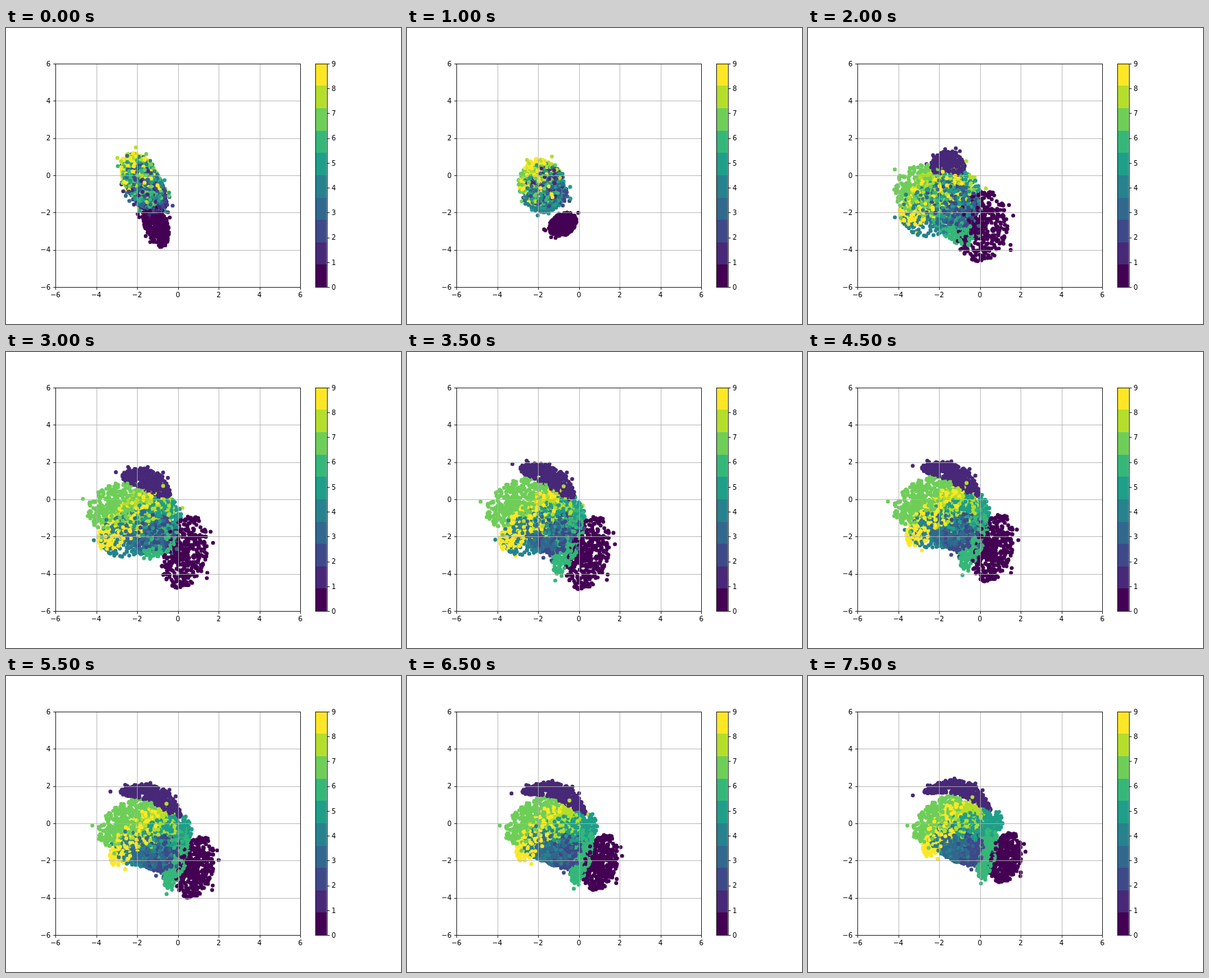
An HTML page with a canvas that plays this animation: 576x432 px, repeating every 8 s.

```html
<!DOCTYPE html>
<html lang="en">
<head>
<meta charset="utf-8">
<title>Scatter of ten classes</title>
<style>
  html, body { margin: 0; width: 576px; height: 432px; overflow: hidden; background: #fff; }
  canvas { display: block; }
</style>
</head>
<body>
<canvas id="plot" width="576" height="432"></canvas>
<script>
const ctx = document.getElementById('plot').getContext('2d');
const COLORS = ['#440154', '#482878', '#3e4989', '#31688e', '#26828e',
                '#1f9e89', '#35b779', '#6ece58', '#b5de2b', '#fde725'];
const LOOP = 8000, STEP = 500, COUNT = 4200, RADIUS = 2.85;
const BOX = { x: 72, y: 51.84, w: 357.12, h: 326.16 };
const BAR = { x: 451.4, w: 16.3 };

const px = x => BOX.x + (x + 6) / 12 * BOX.w;
const py = y => BOX.y + (6 - y) / 12 * BOX.h;
const snap = v => Math.floor(v + 0.5) + 0.5;

// Cross-axis spread of each class.
const WIDTHS = [.46, .25, .4, .45, .53, .48, .27, .5, .5, .36];

// Each class: centre x, y and long axis x, y.
const start = WIDTHS.map((w, c) => c
  ? [-1.5 - .035 * c, -.85 + .08 * c, -.3, .58, .38]
  : [-1.08, -2.6, .17, -.55, .26]);
const spread = [
  [.1, -2.75, .08, .85], [-1.55, .6, .38, -.05], [-1.2, -1.6, .4, -.4],
  [-1.5, -1.6, .5, -.4], [-2.1, -1.75, .75, .4], [-1.35, -1.1, .4, .5],
  [-1.5, -2.35, .45, -.62], [-2.75, -.8, .65, .1], [-1.9, -.95, .7, .4],
  [-2.35, -1.2, .7, .6]
];
const sorted = [
  [.45, -2.9, .2, .88], [-1.4, 1.1, .6, -.4], [-1, -1.85, .4, .4],
  [-1.5, -1.8, .5, -.3], [-2.1, -1.7, .75, .35], [-.95, -1, .5, .3],
  [-.5, -2.2, .26, .82], [-3, -.15, .65, .45], [-1.5, -.8, .5, .4],
  [-2.4, -1.1, .65, .72]
];
const finish = [
  [1.25, -1.85, .13, .6], [-.92, 1.72, .75, -.25], [-.45, -1.4, .1, .4],
  [-1.1, -1.3, .35, -.25], [-1.4, -.9, .45, -.2], [-.1, -.1, .55, .15],
  [.35, -1.6, .12, .62], [-2.05, .25, .5, .5], [-.8, .1, .35, .4],
  [-1.8, -.25, .4, .7]
];
const withWidth = (rows, k) => rows.map((r, c) => [...r, WIDTHS[c] * k]);
const KEYS = [
  { t: 0, rows: start },
  { t: 2000, rows: withWidth(spread, 1.25) },
  { t: 3500, rows: withWidth(sorted, 1) },
  { t: 7500, rows: withWidth(finish, .76) }
];

let seed = 20117;
function rand() {
  seed = seed + 0x6D2B79F5 | 0;
  let v = Math.imul(seed ^ seed >>> 15, 1 | seed);
  v = v + Math.imul(v ^ v >>> 7, 61 | v) ^ v;
  return ((v ^ v >>> 14) >>> 0) / 4294967296;
}

const dots = Array.from({ length: COUNT }, () => {
  const c = Math.floor(rand() * 10);
  const angle = rand() * 2 * Math.PI;
  const stray = rand() < .04 ? 1.35 : 1;
  const r = 2.2 * stray * Math.pow(rand(), .6);
  return { c, a: r * Math.cos(angle), b: r * Math.sin(angle) };
});

function poseAt(t) {
  let i = 0;
  while (i < KEYS.length - 2 && t >= KEYS[i + 1].t) i++;
  const from = KEYS[i], to = KEYS[i + 1];
  let f = (t - from.t) / (to.t - from.t);
  if (i === 0) f *= f;
  return from.rows.map((row, c) => row.map((v, j) => v + (to.rows[c][j] - v) * f));
}

function line(x1, y1, x2, y2) {
  ctx.beginPath();
  ctx.moveTo(x1, y1);
  ctx.lineTo(x2, y2);
  ctx.stroke();
}

function drawDots(t) {
  const pose = poseAt(t), bend = .16 * t / 7500;
  for (const { c, a, b } of dots) {
    const [mx, my, ux, uy, w] = pose[c];
    const len = Math.hypot(ux, uy);
    const off = w * b - (c === 1 ? bend * (a * a - 1) : 0);
    ctx.fillStyle = COLORS[c];
    ctx.beginPath();
    ctx.arc(px(mx + ux * a - uy / len * off), py(my + uy * a + ux / len * off),
            RADIUS, 0, 2 * Math.PI);
    ctx.fill();
  }
}

function drawAxes() {
  const left = snap(BOX.x), right = snap(BOX.x + BOX.w);
  const top = snap(BOX.y), bottom = snap(BOX.y + BOX.h);
  ctx.lineWidth = .8;
  ctx.strokeStyle = '#b0b0b0';
  for (let v = -4; v <= 4; v += 2) {
    line(snap(px(v)), top, snap(px(v)), bottom);
    line(left, snap(py(v)), right, snap(py(v)));
  }
  ctx.strokeStyle = ctx.fillStyle = '#000';
  ctx.strokeRect(left, top, right - left, bottom - top);
  for (let v = -6; v <= 6; v += 2) {
    const label = String(v).replace('-', '\u2212');
    const x = snap(px(v)), y = snap(py(v));
    line(x, bottom, x, bottom + 3.5);
    line(left - 3.5, y, left, y);
    ctx.textAlign = 'center';
    ctx.fillText(label, px(v), 392.6);
    ctx.textAlign = 'right';
    ctx.fillText(label, 65, py(v) + 3.8);
  }
}

function drawBar() {
  const band = BOX.h / 10, end = BAR.x + BAR.w;
  COLORS.forEach((color, i) => {
    const y1 = Math.round(378 - band * (i + 1)), y2 = Math.round(378 - band * i);
    ctx.fillStyle = color;
    ctx.fillRect(BAR.x, y1, BAR.w, y2 - y1);
  });
  ctx.fillStyle = '#000';
  ctx.textAlign = 'left';
  const x = snap(BAR.x), x2 = snap(end), top = snap(BOX.y);
  ctx.strokeRect(x, top, x2 - x, 378.5 - top);
  for (let i = 0; i < 10; i++) {
    const y = 378 - i * BOX.h / 9;
    line(x2, snap(y), x2 + 3.5, snap(y));
    ctx.fillText(i, end + 7, y + 3.8);
  }
}

function draw(t) {
  ctx.fillStyle = '#fff';
  ctx.fillRect(0, 0, 576, 432);
  ctx.font = '10px "DejaVu Sans", sans-serif';
  drawDots(t);
  drawAxes();
  drawBar();
}

let shown = -1;
const begin = performance.now();
function tick() {
  const t = (performance.now() - begin) % LOOP;
  const step = Math.floor(t / STEP);
  if (step !== shown) draw((shown = step) * STEP);
  requestAnimationFrame(tick);
}
tick();
</script>
</body>
</html>
```
